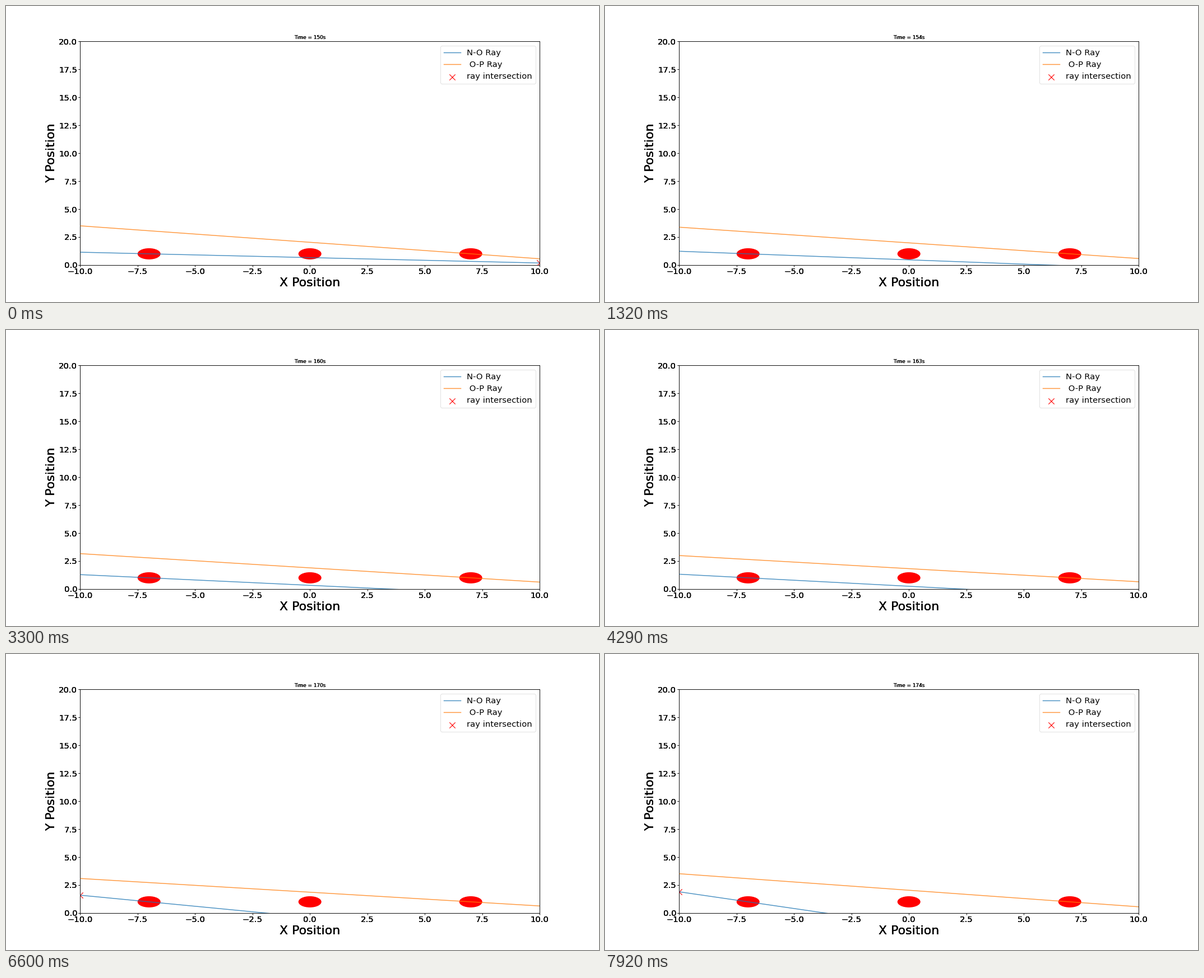
Animation, 1058 px wide and 529 px high, one loop 8 s. Source, as a matplotlib script:

```python
import numpy as np
import matplotlib.pyplot as plt
from matplotlib.animation import FuncAnimation
from matplotlib.patches import Circle

plt.rcParams["font.family"] = "DejaVu Sans"

INTERVAL = 40      # ms per drawn frame
STEP = 330         # ms per simulated second
LOOP = 8000
START = 150
LAYERS = 3         # coincident axes make the frame and its labels heavy
BOX = [0.125, 0.125, 0.775, 0.755]

# Ray slopes at a few times, joined by a smooth curve
KNOTS = np.array([150, 152, 156, 160, 166, 170, 174.0])
NO_SLOPE = np.array([-.0483, -.0640, -.0865, -.0959, -.1325, -.1980, -.2994])
OP_SLOPE = np.array([-.1474, -.1440, -.1362, -.1274, -.1118, -.1230, -.1480])
NO_X, OP_X, SENSOR_Y = -7, 7, 1
XS = np.array([-10, 10])


def smooth(t, values):
    """Cubic Hermite curve through the knots."""
    grad = np.gradient(values, KNOTS)
    i = int(np.clip(np.searchsorted(KNOTS, t, "right") - 1, 0, len(KNOTS) - 2))
    h = KNOTS[i + 1] - KNOTS[i]
    u = (t - KNOTS[i]) / h
    return ((1 + 2 * u) * (1 - u) ** 2 * values[i]
            + u * (1 - u) ** 2 * h * grad[i]
            + u * u * (3 - 2 * u) * values[i + 1]
            + u * u * (u - 1) * h * grad[i + 1])


def ray(x, slope, x0):
    return SENSOR_Y + slope * (x - x0)


def make_axes():
    ax = fig.add_axes(BOX, facecolor="none", label=f"layer{len(fig.axes)}")
    ax.set_xlim(-10, 10)
    ax.set_ylim(0, 20)
    ax.set_xticks(np.arange(-10, 10.1, 2.5))
    ax.set_yticks(np.arange(0, 20.1, 2.5))
    ax.tick_params(labelsize=20)
    ax.set_xlabel("X Position", fontsize=30)
    ax.set_ylabel("Y Position", fontsize=30)
    ax.set_title(" ", fontsize=12)
    return ax


fig = plt.figure(figsize=(20, 10), dpi=52.9, facecolor="white")
layers = [make_axes() for _ in range(LAYERS)]
ax = layers[-1]

for x in (NO_X, 0, OP_X):
    ax.add_patch(Circle((x, SENSOR_Y), 0.5, color="red", lw=0))
no_line, = ax.plot([], [], color="C0", lw=2, alpha=0.8, label="N-O Ray")
op_line, = ax.plot([], [], color="C1", lw=2, alpha=0.8, label=" O-P Ray")
cross = ax.scatter([0], [-5], s=200, marker="x", color="red", lw=1.5,
                   label="ray intersection")
ax.legend(loc="upper right", fontsize=20)


def update(frame):
    t = START + (frame * INTERVAL + INTERVAL - 1) // STEP
    no, op = smooth(t, NO_SLOPE), smooth(t, OP_SLOPE)
    no_line.set_data(XS, ray(XS, no, NO_X))
    op_line.set_data(XS, ray(XS, op, OP_X))

    # The crossing point is held inside the plotted range
    x = np.clip((no * NO_X - op * OP_X) / (no - op), -10, 10)
    cross.set_offsets([[x, ray(x, no, NO_X)]])
    for layer in layers:
        layer.title.set_text(f"Time = {t}s")
    return no_line, op_line, cross


anim = FuncAnimation(fig, update, frames=LOOP // INTERVAL, interval=INTERVAL,
                     init_func=lambda: update(0), repeat=True, repeat_delay=0)
plt.show()
```
